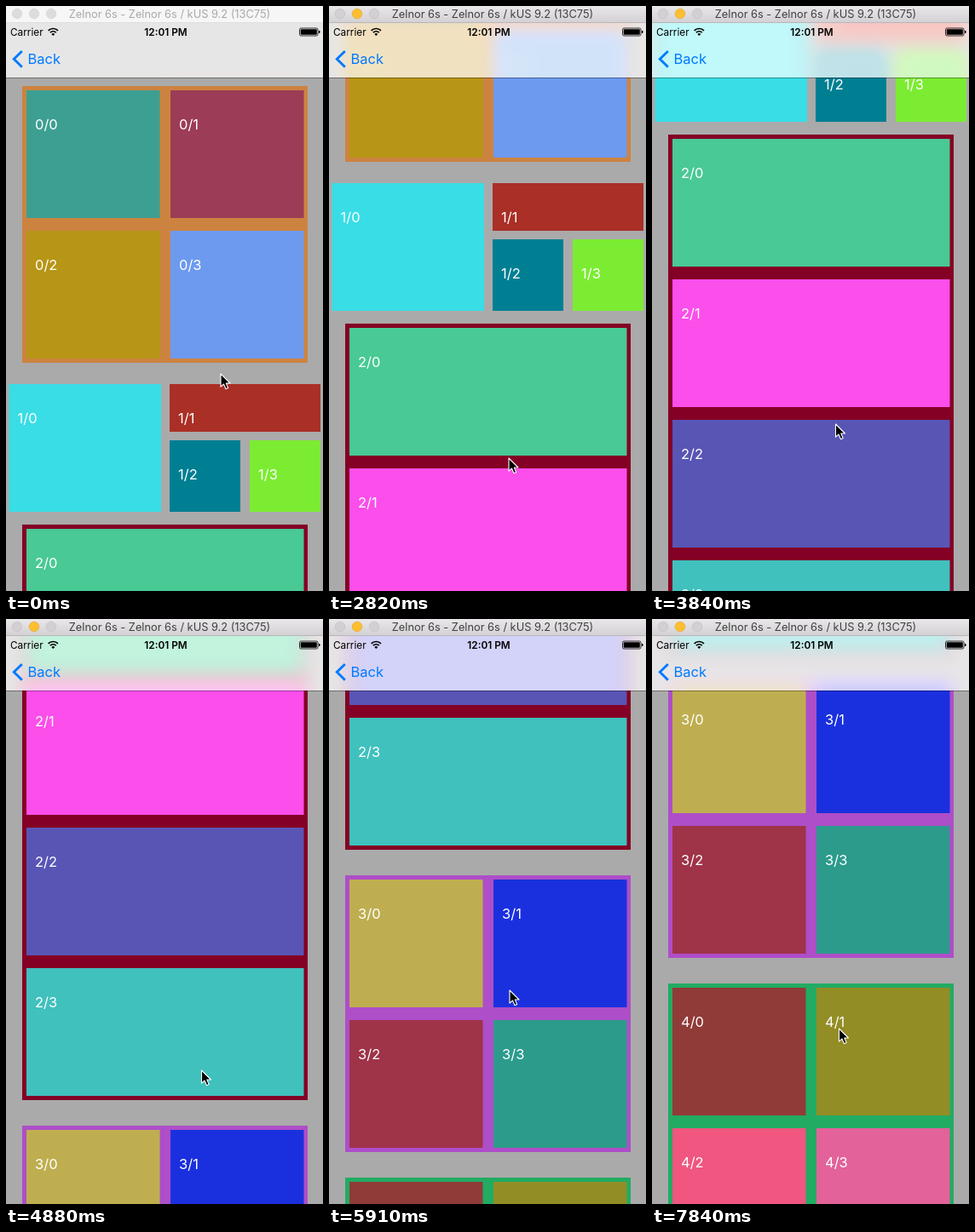
An HTML page for the animation above (7990 ms loop, 372 by 687 pixels).

```html
<!DOCTYPE html>
<html lang="en">
<head>
<meta charset="utf-8">
<title>Collection layout</title>
<style>
  html, body { margin: 0; width: 100%; height: 100%; overflow: hidden; background: #aaa; }
  svg { display: block; width: 372px; height: 687px; }
  text { font-family: Inter, Roboto, sans-serif; }
  .label { font-size: 16.5px; fill: #fff; }
</style>
</head>
<body>
<svg viewBox="0 0 372 687" xmlns="http://www.w3.org/2000/svg">
  <defs>
    <filter id="frost" filterUnits="userSpaceOnUse" x="-40" y="-30" width="452" height="170" color-interpolation-filters="sRGB">
      <feGaussianBlur stdDeviation="10"/>
      <feColorMatrix type="saturate" values="1.8"/>
    </filter>
    <clipPath id="barClip"><rect y="20" width="372" height="64"/></clipPath>
    <linearGradient id="chrome" x2="0" y2="1">
      <stop offset="0" stop-color="#e9e7e9"/><stop offset="1" stop-color="#d2d0d2"/>
    </linearGradient>
  </defs>

  <rect width="372" height="687" fill="#aaa"/>
  <g id="list"></g>

  <g clip-path="url(#barClip)">
    <g filter="url(#frost)">
      <rect x="-40" y="-30" width="452" height="170" fill="#aaa"/>
      <use href="#list"/>
    </g>
    <rect y="20" width="372" height="64" fill="#f8f8f8" fill-opacity=".78"/>
  </g>
  <rect y="84" width="372" height="1" fill="#000" fill-opacity=".35"/>

  <g id="status">
    <text x="5" y="34.5" font-size="11.8">Carrier</text>
    <text x="187.5" y="34.5" font-size="11.8" font-weight="600" text-anchor="middle">12:01 PM</text>
    <g fill="none" stroke="#000" stroke-width="1.7">
      <path d="M49.6 28.9a8 8 0 0 1 11.4 0M51.8 31.2a5 5 0 0 1 7 0"/>
    </g>
    <path d="M53.3 32.9a2.9 2.9 0 0 1 4 0l-2 2.2z"/>
    <rect x="344.5" y="26" width="21.5" height="9" rx="1.8" fill="none" stroke="#000" stroke-width=".8"/>
    <rect x="345.7" y="27.2" width="19.1" height="6.6" rx=".8"/>
    <path d="M367 28.8q1.7 .3 1.7 1.7t-1.7 1.7z"/>
  </g>
  <path d="M18.8 53L9.3 62.3l9.5 9.4" fill="none" stroke="#007aff" stroke-width="2.9"/>
  <text x="25.5" y="68" font-size="16.5" fill="#007aff">Back</text>

  <rect id="titleBar" width="372" height="20"/>
  <rect id="titleEdge" y="19" width="372" height="1"/>
  <g id="dots">
    <circle cx="13" cy="9" r="5.8"/><circle cx="33" cy="9" r="5.8"/><circle cx="53" cy="9" r="5.8"/>
  </g>
  <text id="title" x="192" y="14" font-size="12.8" text-anchor="middle">Zelnor 6s - Zelnor 6s / kUS 9.2 (13C75)</text>

  <path id="cursor" d="M0 0V15.2L3.5 12L6 17.7L8.7 16.6L6.3 11H11Z" stroke="#fff" stroke-width="1.1" stroke-linejoin="round"/>
</svg>
<script>
const $ = id => document.getElementById(id);
const list = $('list');

function add(tag, attrs, text = '') {
  const el = document.createElementNS('http://www.w3.org/2000/svg', tag);
  for (const key in attrs) el.setAttribute(key, attrs[key]);
  el.textContent = text;
  list.append(el);
}

const box = (x, y, width, height, fill) => add('rect', { x, y, width, height, fill });

function cell(name, x, y, w, h, fill) {
  box(x, y, w, h, fill);
  add('text', { x: x + 10, y: y + 46, class: 'label' }, name);
}

// Two cells per row
function grid(n, y, back, colors) {
  box(19, y, 335, 325, back);
  colors.forEach((c, i) =>
    cell(`${n}/${i}`, i % 2 ? 193 : 24, y + 5 + (i >> 1) * 165, 156.5, 150, c));
}

// One cell per row
function stack(n, y, back, colors) {
  box(19, y, 335, 655, back);
  colors.forEach((c, i) => cell(`${n}/${i}`, 24, y + 5 + i * 165, 325.5, 150, c));
}

grid(0, 94, '#cd8340', ['#3d9f92', '#9c3c57', '#b79516', '#6d9aef']);
cell('1/0', 3.5, 444, 178.5, 150, '#38dde5');
cell('1/1', 192, 444, 177, 56, '#aa2f26');
cell('1/2', 192, 510, 83, 84, '#007f93');
cell('1/3', 286, 510, 83, 84, '#7cec32');
stack(2, 609, '#840025', ['#49c994', '#fb4eea', '#5855b5', '#40c1bd']);
grid(3, 1294, '#ae4ec8', ['#bfae50', '#1a30de', '#9f3348', '#2c9b8c']);
grid(4, 1649, '#22ab63', ['#913b38', '#938d25', '#f0567f', '#e3629a']);

const LOOP = 7990, START = 750, TICK = 7090 / 48;

// tick, scroll, cursor x, cursor y, 1 = finger lifted (list coasts to a stop)
const keys = [
  [-1, 0, 252, 432, 1],
  [4.5, 0, 218, 524, 1],
  [6, 32, 219, 492, 0],
  [8, 100, 214, 424, 0],
  [14, 236, 211, 531, 1],
  [17, 337, 209, 430, 0],
  [19.5, 418, 214, 531, 1],
  [21, 458, 215.5, 491, 0],
  [23, 524, 220, 425, 0],
  [28, 699, 229.5, 530, 1],
  [30, 799, 220, 430, 0],
  [33, 898, 212, 531, 1],
  [35, 993, 212, 436, 0],
  [46.6, 1171, 218, 531, 1],
  [48, 1221, 219.5, 481, 0]
];

const coast = p => 1 - (1 - p) ** 3;
const smooth = p => p * p * (3 - 2 * p);
const mix = (a, b, p) => a + (b - a) * p;

function pose(k) {
  const i = Math.max(1, keys.findIndex(key => key[0] >= k));
  const a = keys[i - 1], b = keys[i];
  const p = (k - a[0]) / (b[0] - a[0]);
  const move = b[4] ? smooth(p) : p;
  return {
    scroll: Math.round(mix(a[1], b[1], b[4] ? coast(p) : p)),
    x: mix(a[2], b[2], move),
    y: mix(a[3], b[3], move)
  };
}

function setWindow(active) {
  $('titleBar').setAttribute('fill', active ? 'url(#chrome)' : '#f6f6f6');
  $('titleEdge').setAttribute('fill', active ? '#b9b7b9' : '#dedede');
  $('title').setAttribute('fill', active ? '#404040' : '#a8a8a8');
  [...$('dots').children].forEach((dot, i) => {
    dot.setAttribute('fill', !active ? '#dcdcdc' : i === 1 ? '#fdbe2f' : '#d3cfd2');
    dot.setAttribute('stroke', !active ? '#d2d2d2' : i === 1 ? '#e0a632' : '#c2bec1');
    dot.setAttribute('stroke-width', .6);
  });
}

function draw(t) {
  const k = t < START ? -1 : Math.min(48, Math.floor((t - START) / TICK + .09));
  const { scroll, x, y } = pose(k);
  list.setAttribute('transform', `translate(0 ${-scroll})`);
  $('cursor').setAttribute('transform', `translate(${x} ${y})`);
  setWindow(k >= 5);
}

const began = performance.now();
function frame() {
  draw((performance.now() - began) % LOOP);
  requestAnimationFrame(frame);
}
frame();
</script>
</body>
</html>
```
